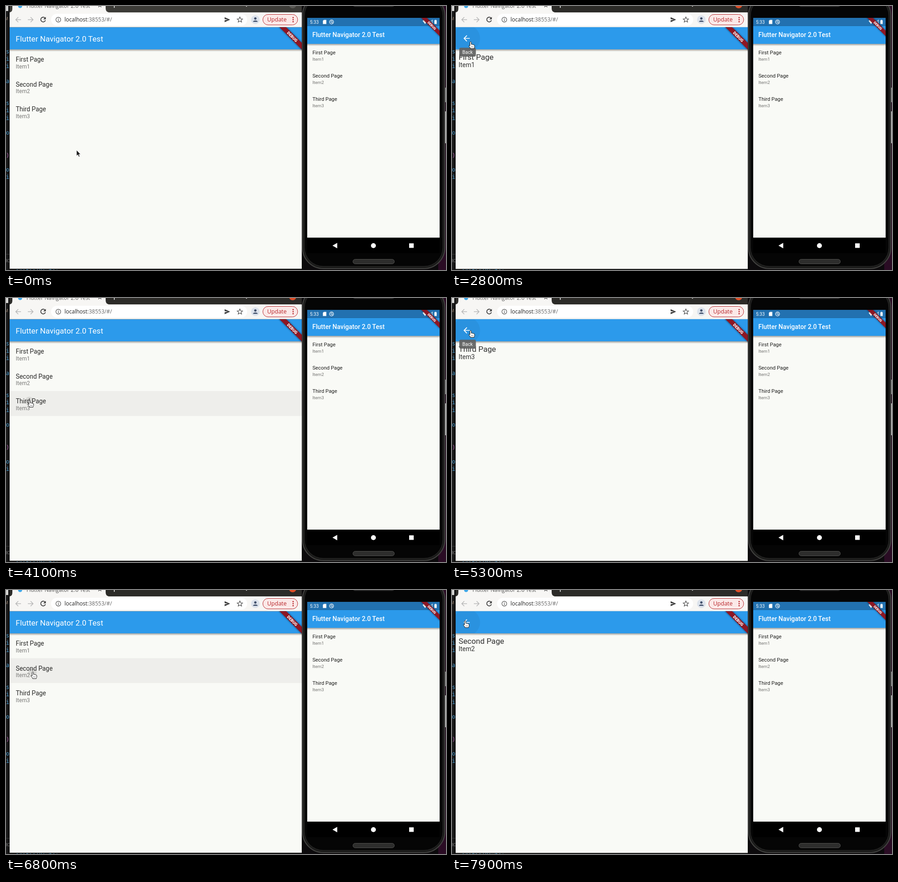
Recreate the animation shown at these times as an HTML page. Size 967 px wide and 579 px high, loop 8000 ms.

```html
<!DOCTYPE html>
<html lang="en">
<head>
<meta charset="utf-8">
<title>Navigator demo</title>
<style>
  html, body { margin: 0; width: 100%; height: 100%; overflow: hidden; background: #111; }
  svg { display: block; }
  text { font-family: Roboto, sans-serif; white-space: pre; }
  .ui { font-family: "Open Sans", sans-serif; }
  .code { font: 12px "Noto Sans Mono", monospace; }
  .debug { font-weight: 900; fill: #fff; text-anchor: middle; }
</style>
</head>
<body>
<svg id="stage" width="967" height="579" viewBox="0 0 967 579"></svg>
<script>
const stage = document.getElementById('stage');
const names = ['First', 'Second', 'Third'];
const LEFT = 8, WIDE = 642, TOP = 46.5, BAR = 95, FOOT = 576.5, ROW = 54.55;
const LOOP = 8000, POP = 400;
const BLUE = '#2c9aeb', PAPER = '#f9faf6';

const text = (x, y, size, fill, s, extra = '') =>
  `<text x="${x}" y="${y}" font-size="${size}" fill="${fill}" ${extra}>${s}</text>`;
const rect = (x, y, w, h, fill, extra = '') =>
  `<rect x="${x}" y="${y}" width="${w}" height="${h}" fill="${fill}" ${extra}/>`;
const circle = (x, y, r, fill, extra = '') =>
  `<circle cx="${x}" cy="${y}" r="${r}" fill="${fill}" ${extra}/>`;
const path = (d, fill, extra = '') => `<path d="${d}" fill="${fill}" ${extra}/>`;
const line = (d, color, w = 1.6) =>
  path(d, 'none', `stroke="${color}" stroke-width="${w}"`);

const items = (x, y, pitch, big, small, gap, ink, soft) => names.map((n, i) =>
  text(x, y + i * pitch, big, ink, n + ' Page') +
  text(x, y + i * pitch + gap, small, soft, 'Item' + (i + 1))).join('');

const shadow = (x, y, w) => rect(x, y, w, 5, 'url(#drop)');

function star(x, y, r) {
  const points = Array.from({ length: 10 }, (_, i) => {
    const a = i * Math.PI / 5, k = i % 2 ? r * .45 : r;
    return `${x + k * Math.sin(a)} ${y - k * Math.cos(a)}`;
  });
  return path(`M${points.join('L')}Z`, 'none', 'stroke="#444" stroke-width="1.2"');
}

// Corner ribbon: a 12-unit band, 28 units from the corner
const banner = (x, y, k, clip) => `<g clip-path="url(#${clip})">
  <g transform="translate(${x} ${y}) rotate(45) scale(${k})">
    ${rect(-42, 26.5, 84, 15, '#000', 'opacity=".35" filter="url(#blur)"')}
    ${rect(-42, 28, 84, 12, '#8d1724')}
    ${text(0, 37.7, 10.2, '#fff', 'DEBUG', 'class="debug"')}
  </g></g>`;

const defs = `<defs>
  <linearGradient id="drop" x2="0" y2="1">
    <stop stop-color="#000" stop-opacity=".36"/><stop offset="1" stop-color="#000" stop-opacity="0"/>
  </linearGradient>
  <linearGradient id="edge"><stop stop-color="#1f1f20"/><stop offset="1" stop-color="#0e0e0e"/></linearGradient>
  <filter id="blur" x="-20%" y="-50%" width="140%" height="200%"><feGaussianBlur stdDeviation="2"/></filter>
  <clipPath id="view">${rect(LEFT, TOP, WIDE, FOOT - TOP, '#000')}</clipPath>
  <clipPath id="screen">${rect(662, 26, 291, 482, '#000')}</clipPath>
  <clipPath id="bar">${rect(LEFT, TOP, WIDE, BAR - TOP, '#000')}</clipPath>
  <clipPath id="left">${rect(0, 0, 7.5, 577, '#000')}</clipPath>
  <clipPath id="foot">${rect(0, 577, 650, 2, '#000')}</clipPath>
  <clipPath id="row">${rect(LEFT, 0, WIDE, ROW, '#000', 'id="rowClip"')}</clipPath>
</defs>`;

function editor() {
  const code = [...'sii a  sii o  ) oi'].map((s, i) =>
    text(0, 104 + i * 16.18, 12, s === ')' ? '#c069b8' : '#4a9fd4', s, 'class="code"'));
  return rect(0, 0, 967, 579, '#121212') + rect(0, 0, 8, 579, 'url(#edge)') +
    rect(0, 0, 5, 11, '#d6d6d4') +
    `<g clip-path="url(#left)">
      ${text(-6, 31, 9, '#a08672', 'IM', 'class="ui"')}
      ${code.join('')}
      ${text(-3, 562, 9, '#8a8a8a', 'RO', 'class="ui"')}
      ${rect(0, 544, 8, 1, '#3a3a3a')}
    </g>
    <g clip-path="url(#foot)">${text(22, 585, 12, '#3f7fa8', 'initialRoute:', 'class="code"')}</g>`;
}

function browser() {
  const gray = '#b9b9b9', ink = '#3c3c3c', red = '#b8252a', bar = '#f7f6f4';
  return rect(LEFT, 0, WIDE, 14, '#3c3b37', 'id="strip"') +
    circle(630, -3, 8, '#5b5a56', 'id="close"') +
    rect(LEFT, 14, WIDE, TOP - 14, bar) +
    path('M8 14C13 13 14 10 14 4V0H219V4C219 10 221 13 226 14Z', bar) +
    circle(31, 0, 4.5, '#3fa9ea') +
    text(45, 4, 12, '#5c5c5c', 'Flutter Navigator 2.0 Test', 'class="ui"') +
    line('M203 -4L209.5 2.5M203 2.5L209.5 -4', '#555', 1.4) +
    line('M234 -1H242M238 -5V4', '#eee') + line('M525 -3L528.5 .5L532 -3', '#eee') +
    rect(99, 17, 431, 26, '#fff', 'rx="13"') +
    line('M33 30H21.5M27 24.5L21.5 30L27 35.5', gray) +
    line('M48 30H59.5M54 24.5L59.5 30L54 35.5', gray) +
    line('M85.5 26.2A5.2 5.2 0 1 0 86.6 31.2', ink, 1.8) + path('M87.5 23.8V29.3H82Z', ink) +
    circle(115, 30, 5.3, 'none', 'stroke="#555" stroke-width="1.2"') +
    line('M115 29V33M115 26.6V28', '#555', 1.3) +
    text(128.5, 34, 12, '#222', 'localhost<tspan fill="#666">:38553/#/</tspan>', 'class="ui"') +
    path('M480.5 24.5L492.5 30L480.5 35.5V31.2L488 30L480.5 28.8Z', ink) +
    star(514, 30.3, 6.2) +
    circle(548, 30, 9.5, '#dde3ec') + circle(548, 27.3, 2.6, '#41506b') +
    path('M542.8 34.8C543 30.6 553 30.6 553.2 34.8Z', '#41506b') +
    rect(564.5, 18.5, 76.5, 23, '#fbe9e8', `rx="11.5" stroke="${red}"`) +
    text(574, 34.3, 12.5, red, 'Update', 'class="ui"') +
    [-1, 0, 1].map(i => circle(631, 30 + i * 4.5, 1.4, red)).join('');
}

function pages() {
  const sheet = rect(LEFT, TOP, WIDE, FOOT - TOP, PAPER);
  const bar = shadow(LEFT, BAR, WIDE) + rect(LEFT, TOP, WIDE, BAR - TOP, BLUE);
  return `<g clip-path="url(#view)">
    <g id="list">
      ${sheet}
      ${rect(LEFT, 0, WIDE, ROW, '#eeeeeb', 'id="hover"')}
      <g clip-path="url(#row)">${circle(0, 0, 0, '#d9d9d6', 'id="ripple"')}</g>
      ${items(21.5, 122.3, ROW, 13.86, 12.1, 14.5, '#2a2a29', '#7a7a78')}
      ${bar}
      ${text(21.3, 77.8, 17.15, '#fff', 'Flutter Navigator 2.0 Test')}
    </g>
    ${rect(LEFT, TOP, WIDE, FOOT - TOP, '#000', 'id="scrim"')}
    <g id="detail">
      ${sheet}
      ${text(14.5, 118, 17.15, '#303030', '', 'id="head"')}
      ${text(14.5, 134, 13.86, '#303030', '', 'id="sub"')}
      ${bar}
      <g clip-path="url(#bar)">${circle(32.2, 71, 29.5, '#000', 'id="glow" opacity=".05"')}</g>
      <path transform="translate(21.8 60.6) scale(.866)" fill="#fff"
        d="M20 11H7.83l5.59-5.59L12 4l-8 8 8 8 1.41-1.41L7.83 13H20z"/>
    </g>
    <g id="tip">${rect(16, 91.5, 36.5, 19.5, '#616161', 'rx="3.4" opacity=".92"')}
      ${text(22.8, 104.8, 10.4, '#fff', 'Back')}</g>
  </g>` + banner(650, TOP, .866, 'view');
}

function phone() {
  return rect(650, 0, 317, 579, '#0c0a0c') + rect(950, 0, 17, 579, '#2a0c24') +
    rect(651.5, -25, 313, 601, '#1b1b1a', 'rx="46" stroke="#434341" stroke-width="2"') +
    rect(656, -20, 304, 591, '#050505', 'rx="41" stroke="#2c2c2b"') +
    rect(965, 179, 2, 32, '#8d8d8d') + rect(965, 231, 2, 70, '#b5b5b5') +
    rect(762, -9, 92, 11, '#2b2b2b', 'rx="5"') +
    rect(762.5, 555.5, 91, 10, '#2d2d2c', 'rx="5" stroke="#525250"') +
    rect(662, 26, 291, 516, '#000') + rect(662, 83, 291, 425, PAPER) +
    rect(662, 26, 291, 17.5, '#2271b0') + shadow(662, 83, 291) +
    rect(662, 43.5, 291, 39.5, BLUE) +
    text(668, 38.8, 10, '#fff', '5:33') +
    path('M698.5 30.5H704V39.5H696.5V32.5Z', '#fff') +
    circle(715.5, 35, 4.4, 'none', 'stroke="#fff" stroke-width="1.2"') +
    circle(715.5, 34.5, 1.8, 'none', 'stroke="#fff"') + line('M716 35L718.5 38', '#fff', 1.1) +
    path('M915.5 32.5C918.5 29.8 923.5 29.8 926.5 32.5L921 39.5Z', '#fff') +
    path('M937 30.5V39.5H928.5Z', 'none', 'stroke="#fff"') +
    path('M942.5 30.5H945.5V31.5H946.5V39.5H941.5V31.5H942.5Z', '#fff') +
    text(673.3, 68.4, 14, '#fff', 'Flutter Navigator 2.0 Test', 'font-weight="500"') +
    items(673.4, 106, 50.8, 11.33, 9.9, 14.2, '#1d1d1c', '#757573') +
    banner(953, 26, .708, 'screen') +
    path('M717.5 525.5L728 519.5V531.5Z', '#fff') + circle(807.5, 525.5, 5.4, '#fff') +
    rect(886, 520.5, 10, 10, '#fff');
}

const cursors = `
  <g id="arrow"><path d="M0 0V12.8L3 10.2L5 15L7.2 14L5.2 9.4H9Z"
    fill="#1c1c1c" stroke="#fff" stroke-width=".8"/></g>
  <g id="hand"><path d="M-1.6 1C-1.6 -1 1.4 -1 1.4 1V5.2C2.5 4.4 3.8 4.8 4 5.7C5 5 6.3 5.5 6.4 6.3C7.5 5.9 8.6 6.5 8.6 7.8V10.6C8.6 12 7.6 12.6 7.5 14.4H-.4C-.6 12.6 -2.4 11 -3.8 9.2C-4.6 7.9 -3.4 7 -1.6 8.5Z"
    fill="#fff" stroke="#111"/><path d="M1.5 9.5V12M3.5 9.5V12M5.5 9.5V12" stroke="#555" stroke-width=".7"/></g>`;

stage.innerHTML = defs + editor() + browser() + pages() + phone() + cursors;

// Visits to an item: tap, page opens (over rise ms), back pressed, page closes
const visits = [
  { item: 0, tap: 1200, open: 1500, rise: 200, press: 3000, close: 3000 },
  { item: 2, tap: 4100, open: 4400, rise: 0, press: 5800, close: 5800 },
  { item: 1, tap: 6800, open: 7000, rise: 200, press: 7900, close: LOOP }
];
// Pointer moves: start, end, x, y reached
const moves = [
  [-1, 0, 155, 316], [100, 200, 188, 345], [400, 900, 48, 120],
  [2100, 2500, 85, 149], [2500, 2800, 41, 79], [2900, 3400, 63, 247],
  [3500, 3900, 52, 225], [4500, 4900, 130, 253], [4900, 5300, 41, 72],
  [5400, 5600, 32, 66], [5800, 6100, 67.5, 209], [6200, 6500, 59, 180],
  [6800, 7100, 58, 181], [7200, 7600, 32, 75], [7700, 7900, 29, 68]
];

const el = id => document.getElementById(id);
const show = (id, on) => el(id).setAttribute('visibility', on ? 'visible' : 'hidden');
const put = (id, attrs) => { for (const a in attrs) el(id).setAttribute(a, attrs[a]); };
const clamp = v => Math.max(0, Math.min(1, v));
const smooth = v => v * v * (3 - 2 * v);
const zoom = k => k === 1 ? '' : `translate(329 311.75) scale(${k}) translate(-329 -311.75)`;

function pointer(t) {
  const i = moves.findLastIndex(m => m[0] <= t);
  const [from, to, x, y] = moves[i], [, , px, py] = moves[i - 1] || moves[i];
  const p = smooth(clamp((t - from) / (to - from)));
  return { x: px + (x - px) * p, y: py + (y - py) * p, seen: Math.min(t, to) };
}

function scene(t) {
  const v = visits.findLast(v => v.tap <= t) || visits[0];
  const s = { v, list: 1, detail: 1, alpha: 0, scrim: 0, busy: false };
  if (t >= v.close) {
    const p = clamp((t - v.close) / POP), left = (1 - p) ** 3;
    Object.assign(s, { list: 1 + .03 * left, detail: 1 - .03 * p,
      alpha: Math.max(0, .4 - 2 * p), busy: p < 1 });
  } else if (t >= v.open) {
    const p = v.rise ? clamp((t - v.open) / v.rise) : 1;
    Object.assign(s, { list: 1.045 + .005 * p, detail: .9875 + .0125 * p,
      alpha: 1, scrim: p < 1 ? .6 : 0, busy: p < 1 });
  }
  return s;
}

const rowAt = y => Math.floor((y - BAR) / ROW);
const onBack = (x, y) => x < 62 && y < BAR;

// The pointer's shape is renewed only while it moves
function isHand({ x, y, seen }) {
  const s = scene(seen);
  if (s.busy) return false;
  return s.alpha ? onBack(x, y) : rowAt(y) >= 0 && rowAt(y) < 3;
}

function draw(t) {
  const at = pointer(t), hand = isHand(at), s = scene(t), v = s.v;

  put('list', { transform: zoom(s.list) });
  put('detail', { transform: zoom(s.detail), opacity: s.alpha });
  show('detail', s.alpha > 0);
  put('scrim', { opacity: s.scrim });
  el('head').textContent = names[v.item] + ' Page';
  el('sub').textContent = 'Item' + (v.item + 1);

  const row = rowAt(at.y), over = hand && !s.alpha && row >= 0;
  const since = t - v.tap, wet = over && since >= 0 && since < 400;
  show('hover', over);
  show('ripple', wet);
  if (over) ['hover', 'rowClip'].forEach(id => put(id, { y: BAR + row * ROW }));
  if (wet) put('ripple', { cx: at.x - 1, cy: at.y + 1, r: 9.5 + since * .12 });

  const back = hand && s.alpha === 1 && onBack(at.x, at.y);
  show('glow', back);
  show('tip', back && t < v.press);
  show('arrow', !hand);
  show('hand', hand);
  put(hand ? 'hand' : 'arrow', { transform: `translate(${at.x} ${at.y})` });

  const focused = t >= visits[0].tap;
  put('strip', { fill: focused ? '#2c2b28' : '#3c3b37' });
  put('close', { fill: focused ? '#df4f28' : '#5b5a56' });
}

const start = performance.now();
function tick() {
  const t = (performance.now() - start) % LOOP;
  draw(Math.floor(t / 100) * 100);
  requestAnimationFrame(tick);
}
tick();
</script>
</body>
</html>
```
